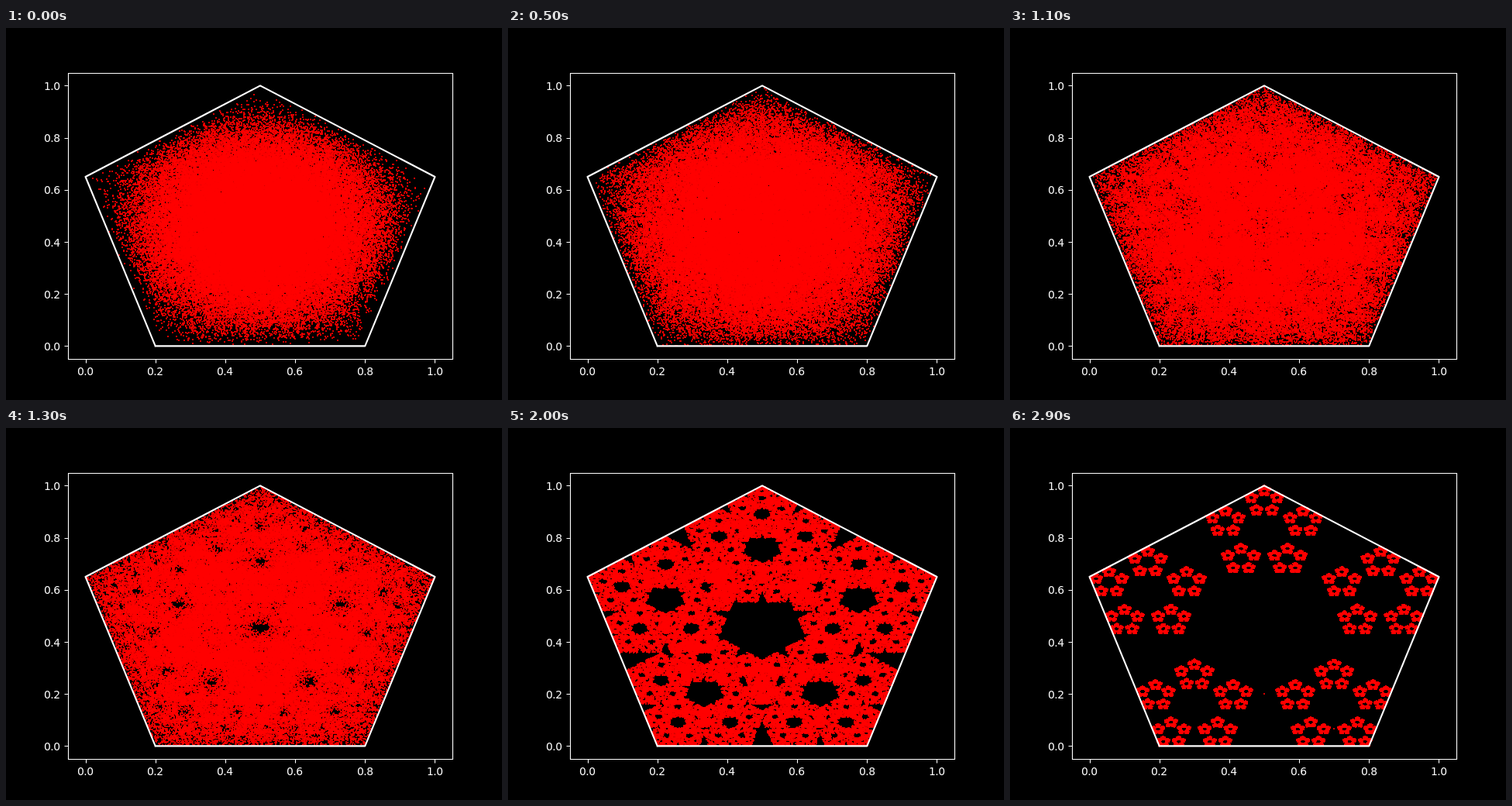
Write an HTML page with a canvas that moves like this. It is 640 by 480 pixels and loops after 3 s.

```html
<!DOCTYPE html>
<html lang="en">
<head>
<meta charset="utf-8">
<title>Chaos game in a pentagon</title>
<style>
  html, body { margin: 0; width: 100%; height: 100%; overflow: hidden; background: #000; }
  canvas, svg { position: absolute; left: 0; top: 0; width: 640px; height: 480px; }
  text { font: 13.89px "DejaVu Sans", sans-serif; letter-spacing: -0.5px; fill: #fff; }
</style>
</head>
<body>
<canvas id="dots" width="640" height="480"></canvas>
<svg id="axes" viewBox="0 0 640 480"></svg>
<script>
const W = 640, H = 480, STEP = 100, STEPS = 30, COUNT = 100000;
const corners = [[0.2, 0], [0.8, 0], [1, 0.65], [0.5, 1], [0, 0.65]];
const toX = x => 102.545 + 450.909 * x;
const toY = y => 410.4 - 336 * y;

function add(tag, attrs, text) {
  const el = document.createElementNS("http://www.w3.org/2000/svg", tag);
  for (const key in attrs) el.setAttribute(key, attrs[key]);
  if (text) el.textContent = text;
  document.getElementById("axes").append(el);
}

function drawAxes() {
  const outline = [...corners, corners[0]].map(([x, y]) => toX(x) + "," + toY(y)).join(" ");
  add("polyline", { points: outline, fill: "none", stroke: "#fff", "stroke-width": 2.08,
    "stroke-linecap": "square", "stroke-linejoin": "round" });
  let d = "M80.5 58.5H576.5V427.5H80.5Z";
  for (let i = 0; i <= 5; i++) {
    const v = i / 5, label = v.toFixed(1);
    const x = Math.round(toX(v)) + 0.5, y = Math.round(toY(v)) + 0.5;
    d += `M${x} 427.5v5M80.5 ${y}h-5`;
    add("text", { x: Math.round(toX(v) - 10.6), y: 448 }, label);
    add("text", { x: 49, y: Math.floor(toY(v)) + 5.5 }, label);
  }
  add("path", { d, fill: "none", stroke: "#fff", "stroke-width": 1.11 });
}

function random(seed) {
  return () => {
    seed = (seed + 0x6D2B79F5) | 0;
    let t = Math.imul(seed ^ (seed >>> 15), 1 | seed);
    t = (t + Math.imul(t ^ (t >>> 7), 61 | t)) ^ t;
    return ((t ^ (t >>> 14)) >>> 0) / 4294967296;
  };
}

const ctx = document.getElementById("dots").getContext("2d");
const img = ctx.createImageData(W, H);
const glow = new Float32Array(W * H);

// Each point jumps a fixed share of the way to a random corner.
function drawDots(step) {
  const share = 0.3 + (2 / 3 - 0.3) * step / (STEPS - 1);
  const rand = random(step * 977 + 5);
  let x = 0.5, y = 0.2;
  glow.fill(0);
  for (let n = 0; n < COUNT; n++) {
    // A round dot centred on a pixel corner covers two by two pixels.
    const i = Math.round(toY(y)) * W + Math.round(toX(x));
    for (const k of [i, i - 1, i - W, i - W - 1]) glow[k] += (1 - glow[k]) * 0.84;
    const [cx, cy] = corners[Math.floor(rand() * 5)];
    x += (cx - x) * share;
    y += (cy - y) * share;
  }
  for (let i = 0; i < glow.length; i++) {
    img.data[4 * i] = 255 * glow[i];
    img.data[4 * i + 3] = 255;
  }
  ctx.putImageData(img, 0, 0);
}

let shown = -1;
function tick() {
  const step = Math.floor(performance.now() / STEP) % STEPS;
  if (step !== shown) drawDots(shown = step);
  requestAnimationFrame(tick);
}

drawAxes();
tick();
</script>
</body>
</html>
```
